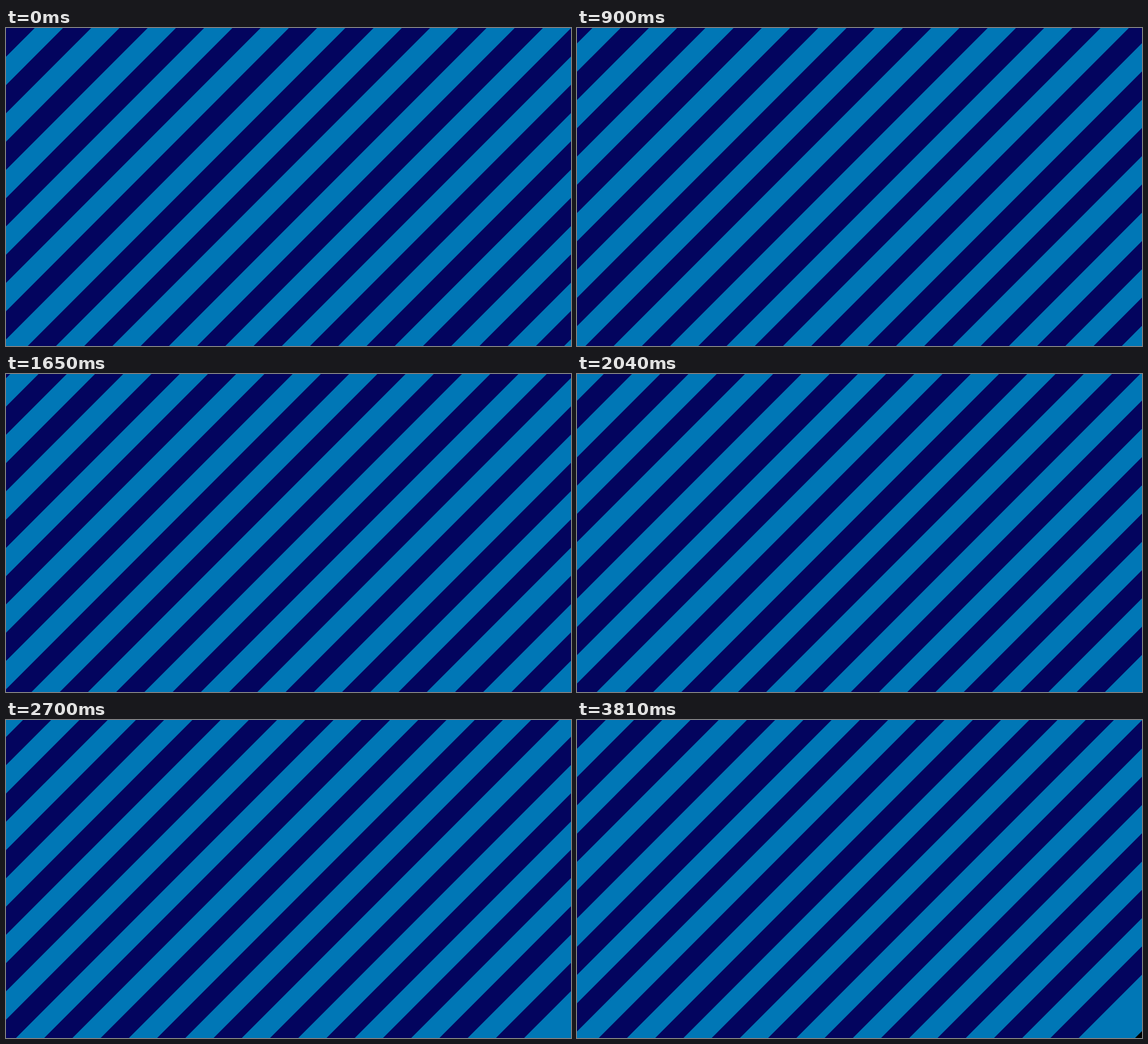
These frames come from a looping animation (998x561 px, 3.84 s). An HTML page with a canvas:

```html
<!DOCTYPE html>
<html lang="en">
<head>
<meta charset="utf-8">
<title>Diagonal stripes</title>
<style>
html, body { margin: 0; width: 100%; height: 100%; overflow: hidden; background: #000; }
canvas { display: block; }
</style>
</head>
<body>
<canvas id="stage" width="998" height="561"></canvas>
<script>
const ctx = document.getElementById("stage").getContext("2d");
const W = 998, H = 561;
const NAVY = "#03045e", BLUE = "#0077b6";
const BAND = 49.87;        // band width measured along the x axis
const FIRST = 50.8;        // right end of the first navy band at the start
const BLUE_END = 1646.4;   // where the blue sheet stops
const STEP = 30, STEPS = 128;

// Fills the diagonal strip a <= x + y <= b.
function strip(a, b, color) {
  ctx.fillStyle = color;
  ctx.beginPath();
  ctx.moveTo(a, 0);
  ctx.lineTo(b, 0);
  ctx.lineTo(b - H, H);
  ctx.lineTo(a - H, H);
  ctx.fill();
}

function draw(time) {
  const step = Math.floor(time / STEP) % STEPS;
  const shift = 2 * BAND * step / (STEPS - 1);
  ctx.fillStyle = "#000";
  ctx.fillRect(0, 0, W, H);
  strip(-200, BLUE_END - shift, BLUE);
  for (let i = 0; i <= 15; i++) {
    const end = FIRST + 2 * BAND * i - shift;
    strip(end - BAND, end, NAVY);
  }
}

const start = performance.now();
function tick() {
  draw(performance.now() - start);
  requestAnimationFrame(tick);
}
tick();
</script>
</body>
</html>
```
